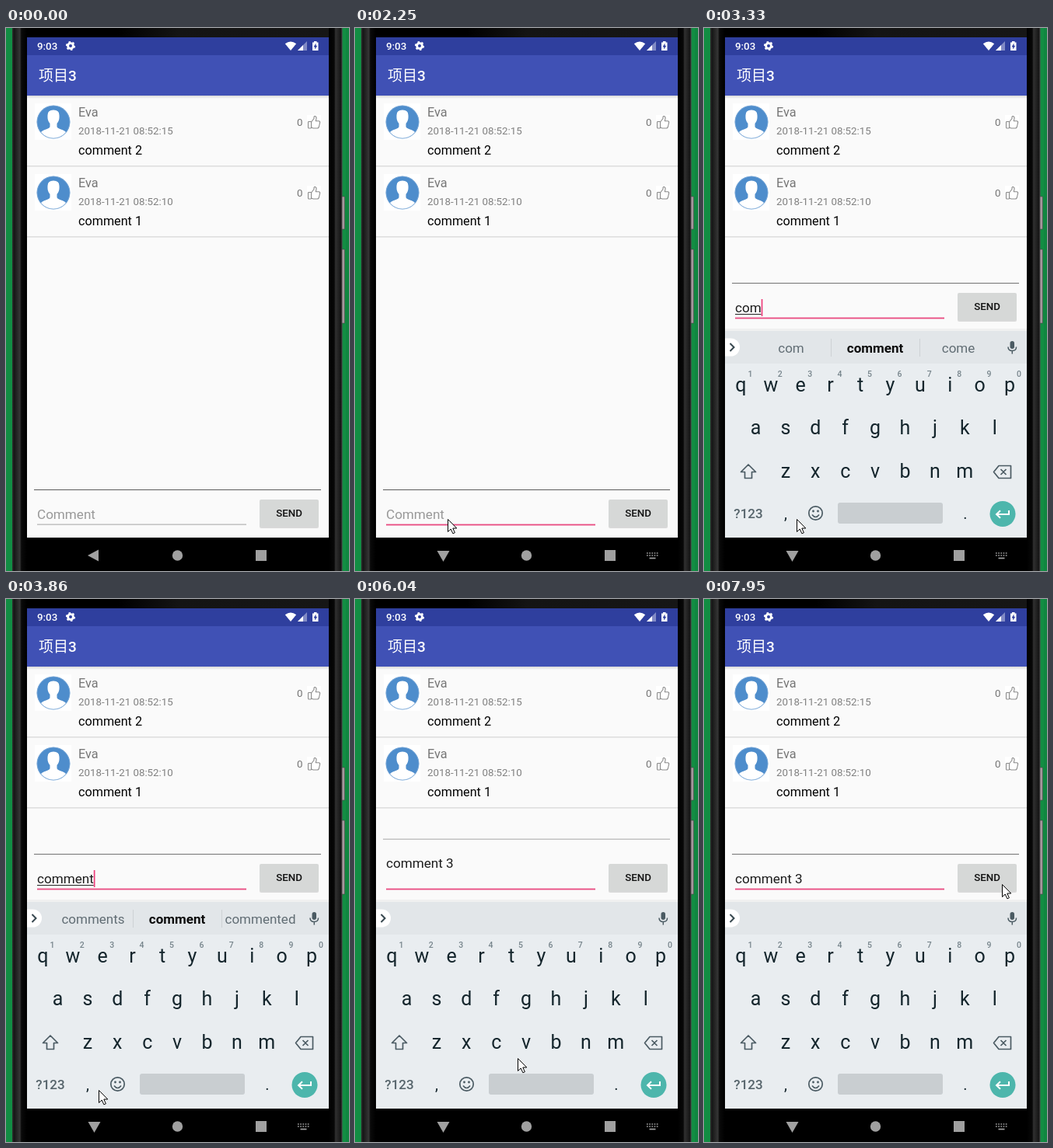
These frames come from a looping animation (441 by 699 pixels, 8000 ms). An HTML page:

```html
<!DOCTYPE html>
<html lang="en">
<head>
<meta charset="utf-8">
<title>Comment app</title>
<style>
html, body { margin: 0; width: 100%; height: 100%; overflow: hidden; background: #128d43; }
svg { display: block; width: 441px; height: 699px; font-family: Roboto, "Noto Sans CJK SC", "Noto Sans CJK", sans-serif; }
.mid { text-anchor: middle; }
</style>
</head>
<body>
<svg id="stage" viewBox="0 0 441 699" xmlns="http://www.w3.org/2000/svg">
  <defs>
    <linearGradient id="left"><stop offset="0" stop-color="#333"/><stop offset=".12" stop-color="#161616"/><stop offset=".3" stop-color="#242424"/><stop offset=".52" stop-color="#363636"/><stop offset=".62" stop-color="#0a0a0a"/><stop offset="1" stop-color="#000"/></linearGradient>
    <linearGradient id="right"><stop offset="0" stop-color="#000"/><stop offset=".4" stop-color="#080808"/><stop offset=".5" stop-color="#303030"/><stop offset=".7" stop-color="#232323"/><stop offset=".88" stop-color="#151515"/><stop offset="1" stop-color="#4c4c4c"/></linearGradient>
    <linearGradient id="top"><stop offset=".3" stop-color="#000"/><stop offset=".5" stop-color="#141414"/><stop offset="1" stop-color="#161616"/></linearGradient>
    <linearGradient id="shade" x2="0" y2="1"><stop offset="0" stop-color="#000" stop-opacity=".14"/><stop offset="1" stop-color="#000" stop-opacity="0"/></linearGradient>
    <clipPath id="screen"><rect x="27" y="12" width="388" height="687"/></clipPath>
    <clipPath id="face"><circle cx="61" cy="121" r="21"/></clipPath>
    <g id="avatar">
      <rect x="37" y="97" width="47" height="47" fill="#fff"/>
      <circle cx="61" cy="121" r="21.3" fill="#4e8dcc"/>
      <g clip-path="url(#face)" fill="#fff">
        <path d="M53.500 113Q53 105.500 61 105.500T68.500 113Q69 119 65.500 123V127Q66 129 70 130.300Q76 132 77.500 135V143H44.500V135Q46 132 52 130.300Q56 129 56.500 127V123Q53 119 53.500 113Z"/>
      </g>
      <circle cx="61" cy="121" r="21" fill="none" stroke="#7fabd9" stroke-width=".8"/>
    </g>
    <g id="thumb" fill="none" stroke="#8a8a8a" stroke-width="1.1" stroke-linejoin="round">
      <rect x="388.500" y="120.500" width="4" height="8.500" rx=".8"/>
      <path d="M392.500 121L396 116.500V114.500Q396.200 113.300 397.400 113.500Q399.300 114 399 116.500L398.300 119.700H402Q404 120 403.600 121.800L402.300 127.500Q401.800 129 400.300 129H395L392.500 128"/>
    </g>
  </defs>

  <rect width="441" height="699" fill="#128d43"/>
  <rect x="437" width="4" height="699" fill="#108640"/>
  <rect x="8" width="424" height="699" fill="#0c0c0c"/>
  <rect x="27" width="388" height="12" fill="url(#top)"/>
  <rect x="8" width="19" height="699" fill="url(#left)"/>
  <rect x="415" width="17.500" height="699" fill="url(#right)"/>
  <g fill="#a3969c" stroke="#4a4246" stroke-width=".6">
    <rect x="432" y="217" width="3.300" height="42"/>
    <rect x="432" y="285" width="3.300" height="95"/>
  </g>

  <g clip-path="url(#screen)">
    <rect x="27" y="12" width="388" height="645" fill="#fafafa"/>
    <rect x="27" y="12" width="388" height="23" fill="#2f3f9e"/>
    <rect x="27" y="35" width="388" height="52" fill="#4051b5"/>
    <rect x="27" y="87" width="388" height="4" fill="url(#shade)"/>
    <g fill="#fff">
      <text x="40" y="28" font-size="13.300" font-weight="500">9:03</text>
      <g fill="none" stroke="#fff">
        <circle cx="83" cy="23" r="3.400" stroke-width="2.800"/>
        <circle cx="83" cy="23" r="5" stroke-width="2.200" pathLength="12" stroke-dasharray="1 1"/>
      </g>
      <path d="M366 29L358.800 20.300Q366 14.500 373.200 20.300Z"/>
      <path d="M375 29H387V17Z" opacity=".4"/>
      <path d="M375 29H382V22Z"/>
      <path d="M394 18.500H396V17H399.500V18.500H401.500V29H394Z"/>
      <path d="M398.500 19.500L395.500 24.500H397.300V27.800L400.200 22.800H398.500Z" fill="#2f3f9e"/>
      <text x="42" y="68" font-size="19">项目<tspan font-weight="500">3</tspan></text>
    </g>
    <g id="rows"></g>

    <rect id="rule" x="36" width="369" height="1"/>
    <g id="form">
      <rect x="326" y="608.500" width="76" height="35.500" rx="2" fill="#000" opacity=".13"/>
      <rect x="326" y="607" width="76" height="35.500" rx="2" fill="#d6d8d7"/>
      <text class="mid" x="364" y="629" font-size="13.300" font-weight="500" fill="#111">SEND</text>
      <rect id="under" x="40" width="269"/>
      <text id="hint" x="40" y="632" font-size="17.100" fill="#999">Comment</text>
      <text id="typed" x="40" font-size="17.100" fill="#1c1c1c" xml:space="preserve"></text>
      <rect id="compose" x="40" y="634" height="1" fill="#222"/>
      <rect id="caret" y="615" width="1.700" height="22" fill="#ee3f7c"/>
    </g>

    <rect x="27" y="656" width="388" height="43" fill="#000"/>
    <g id="board">
      <rect x="27" y="387" width="388" height="3" fill="#000" opacity=".04"/>
      <rect x="27" y="390" width="388" height="266" fill="#e9edf0"/>
      <rect x="27" y="390" width="388" height="42" fill="#e2e6e9"/>
      <rect x="15" y="399.500" width="31" height="23" rx="11.500" fill="#fff"/>
      <path d="M33.500 406L38.500 411L33.500 416" fill="none" stroke="#37474f" stroke-width="2"/>
      <g id="strip">
        <path d="M163.500 400V423M277.500 400V423" stroke="#cdd2d5"/>
      </g>
      <g fill="#4b5b63">
        <rect x="393.500" y="403" width="5.500" height="10" rx="2.750"/>
        <path d="M391 410.500Q391 415.500 396.300 415.500T401.500 410.500M396.300 415.500V419.500" fill="none" stroke="#4b5b63" stroke-width="1.500"/>
      </g>
      <g id="keys"></g>
      <g fill="none" stroke="#4b5b63" stroke-width="1.700" stroke-linejoin="round">
        <path d="M57 562L47.500 571.500H52.500V579.500H61.500V571.500H66.500Z"/>
        <path d="M379 563.500H394.500V579.500H379L372.500 571.500ZM381.500 568L388.500 575M388.500 568L381.500 575"/>
        <circle cx="143.500" cy="624.500" r="8.700"/>
        <path d="M139 626.500Q143.500 632.500 148 626.500"/>
      </g>
      <circle cx="140.500" cy="622" r="1.400" fill="#4b5b63"/>
      <circle cx="146.500" cy="622" r="1.400" fill="#4b5b63"/>
      <rect x="172" y="611" width="135" height="27" rx="3" fill="#c9ced1"/>
      <text class="mid" x="57" y="631" font-size="17" font-weight="500" fill="#56646b">?123</text>
      <circle cx="384" cy="625.500" r="16.500" fill="#4db6ac"/>
      <path d="M392 621V626H376.500M381 621.200L376 626L381 630.800" fill="none" stroke="#fff" stroke-width="2"/>
    </g>
    <g fill="#a0a0a0">
      <path id="back"/>
      <circle cx="220.500" cy="679" r="6.700"/>
      <rect x="321" y="672" width="14" height="14"/>
      <g id="ime" fill="none" stroke="#a0a0a0" stroke-width="1.700">
        <path d="M375 676H390M375 679H390" stroke-dasharray="1.700 1.500"/>
        <path d="M378.500 682.500H386.500"/>
      </g>
    </g>
  </g>
  <path id="mouse" d="M.5 .5V16.500L4.200 13L6.900 18.800L9.400 17.700L6.800 12H11.800Z" fill="#fff" stroke="#000" stroke-width="1"/>
</svg>
<script>
const NS = "http://www.w3.org/2000/svg";
const $ = id => document.getElementById(id);
const LOOP = 8000;

function add(parent, tag, attrs, text) {
  const el = document.createElementNS(NS, tag);
  for (const k in attrs) el.setAttribute(k, attrs[k]);
  if (text !== undefined) el.textContent = text;
  parent.appendChild(el);
  return el;
}
const set = (id, attrs) => { for (const k in attrs) $(id).setAttribute(k, attrs[k]); };
const show = (id, on) => { $(id).style.display = on ? "" : "none"; };

// comment list
[["2018-11-21 08:52:15", "comment 2"], ["2018-11-21 08:52:10", "comment 1"]].forEach(([date, body], i) => {
  const g = add($("rows"), "g", { transform: `translate(0 ${i * 91})` });
  add(g, "use", { href: "#avatar" });
  add(g, "text", { x: 93, y: 114, "font-size": 16.2, fill: "#757575" }, "Eva");
  add(g, "text", { x: 93, y: 137, "font-size": 13.3, fill: "#808080" }, date);
  add(g, "text", { x: 93, y: 163, "font-size": 16.2, fill: "#000" }, body);
  add(g, "text", { x: 374, y: 126, "font-size": 13.3, fill: "#757575" }, "0");
  add(g, "rect", { x: 387, y: 112, width: 18, height: 18, fill: "#fff" });
  add(g, "use", { href: "#thumb" });
  add(g, "rect", { x: 27, y: 177, width: 388, height: 1.6, fill: "#dedede" });
});

// letter keys
[["qwertyuiop", 47.4, 467.5], ["asdfghjkl", 66.5, 523], ["zxcvbnm", 104.9, 578.5]].forEach(([row, x0, y], r) => {
  [...row].forEach((ch, i) => {
    const x = x0 + i * 38.4;
    add($("keys"), "text", { class: "mid", x, y, "font-size": 25, fill: "#14252c" }, ch);
    if (r === 0) add($("keys"), "text", { class: "mid", x: x + 12, y: 449, "font-size": 10.5, "font-weight": 500, fill: "#76848b" }, (i + 1) % 10);
  });
});
[[",", 105], [".", 336]].forEach(([ch, x]) =>
  add($("keys"), "text", { class: "mid", x, y: 632, "font-size": 20, fill: "#14252c" }, ch));

const words = [112, 220, 327].map(x =>
  add($("strip"), "text", { class: "mid", x, y: 417.5, "font-size": 17, fill: "#616d74" }));

// time, x, y of the pointer
const path = [
  [230, 195, 692], [600, 172, 668], [960, 150, 654], [1060, 149, 653], [1500, 130, 641],
  [1860, 119, 635], [1960, 119, 634], [2070, 119, 632], [4600, 119, 632], [4680, 125, 624],
  [5100, 170, 606], [5480, 206, 599], [5580, 207, 598], [5900, 209, 592], [6040, 209, 591],
  [6400, 226, 548], [6750, 268, 460], [6850, 288, 440], [7200, 370, 396], [7420, 404, 379],
  [7650, 389, 374], [7750, 387, 372], [7950, 383, 367]
];
const typing = [
  [0, ""], [2990, "c"], [3040, "co"], [3200, "com"], [3380, "comm"], [3460, "comme"],
  [3640, "commen"], [3740, "comment"], [3890, "comment "], [4150, "comment 3"]
];
const hints = [
  [0, "thanks|I|we"], [3010, "c|can|come"], [3080, "co|could|come"], [3240, "com|comment|come"],
  [3420, "comm|comment|comments"], [3680, "commen|comment|comments"], [3780, "comments|comment|commented"],
  [3930, "on|is|and"], [4190, ""], [4530, "thanks|I|we"], [6040, ""]
];
const latest = (list, t) => list.filter(e => e[0] <= t).pop()[1];

function pointer(t) {
  for (let i = 1; i < path.length; i++) {
    const [a, ax, ay] = path[i - 1], [b, bx, by] = path[i];
    if (t < b) {
      const p = (t - a) / (b - a);
      return [Math.round(ax + (bx - ax) * p), Math.round(ay + (by - ay) * p)];
    }
  }
  return path[path.length - 1].slice(1);
}

// the caret stays lit while keys go down, then blinks every half second
function caretOn(t) {
  if (t < 2260) return false;
  if (t < 2990) return t < 2760;
  if (t < 4680) return true;
  return Math.floor((t - 4680) / 500) % 2 === 1;
}

function draw(t) {
  const raised = t >= 2440, focused = t >= 1980, imeOn = t >= 2240;
  const twoLines = t >= 4340 && t < 6170;
  const lift = raised ? -266 : 0;

  set("rule", { y: twoLines ? 308.5 : 594 + lift, height: twoLines ? 1.5 : 1,
    fill: twoLines ? "#c2c2c2" : raised ? "#727272" : "#5b5b5b" });
  set("form", { transform: `translate(0 ${lift})` });
  set("under", focused ? { y: 638.6, height: 1.8, fill: "#e84a80" } : { y: 638.6, height: 1, fill: "#a4a4a4" });

  const str = latest(typing, t);
  $("typed").textContent = str;
  set("typed", { y: twoLines ? 612 : 632 });
  show("hint", !str);
  const width = str ? $("typed").getComputedTextLength() : 0;
  const composing = t >= 2990 && t < 3890;
  show("compose", composing);
  set("compose", { width });
  set("caret", { x: 40 + (twoLines ? 0 : width) });
  show("caret", caretOn(t));

  const p = Math.min(1, Math.max(0, (t - 2420) / 350));
  const left = (1 - p) ** 3;
  show("board", t >= 2420);
  set("board", { transform: `translate(0 ${Math.round(55 * left)})`, opacity: Math.min(1, 1 - 1.3 * left + 0.3 * left * left) });
  const list = latest(hints, t);
  show("strip", list);
  list.split("|").forEach((w, i) => {
    const bold = i === 1 && composing;
    words[i].textContent = w;
    words[i].setAttribute("font-weight", bold ? 700 : 400);
    words[i].setAttribute("fill", bold ? "#0c0c0c" : "#616d74");
  });

  set("back", { d: imeOn ? "M105.5 673H121.5L113.500 687Z" : "M105 679L119 671.500V686.500Z" });
  show("ime", imeOn);

  show("mouse", t >= 230);
  if (t >= 230) set("mouse", { transform: `translate(${pointer(t).join(" ")})` });
}

const start = performance.now();
function tick(now) {
  draw(Math.max(0, now - start) % LOOP);
  requestAnimationFrame(tick);
}
draw(0);
requestAnimationFrame(tick);
</script>
</body>
</html>
```
